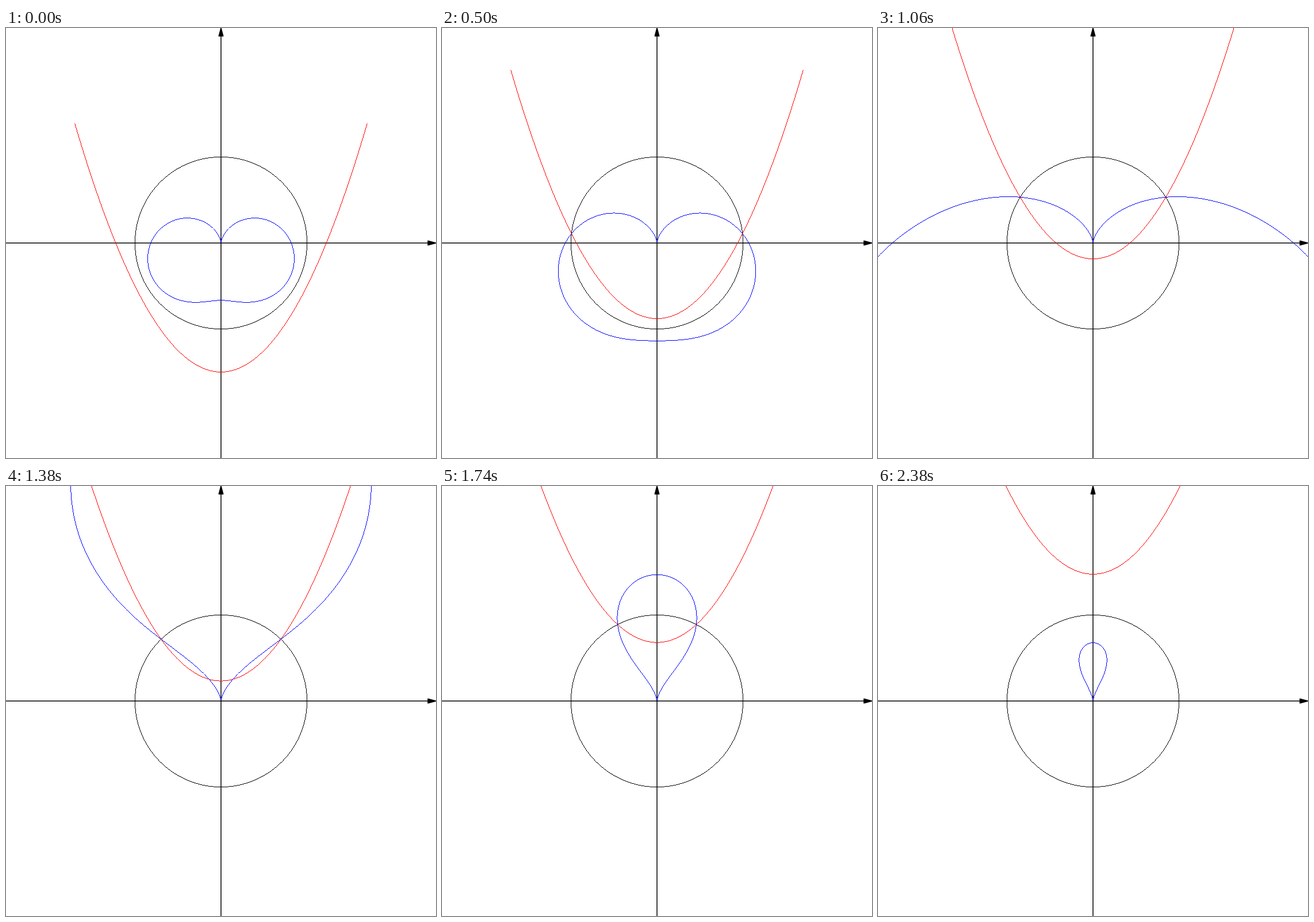
A matplotlib script for the animation above (2400 ms loop, 748x748 px).

```python
import matplotlib.pyplot as plt
import numpy as np
from matplotlib.animation import FuncAnimation

SIZE = 748
DPI = 64
PX = 72 / DPI          # one pixel in points
MID = SIZE / 2
UNIT = SIZE / 5        # the stage spans -2.5..2.5
FRAMES = 120
HALF = FRAMES // 2
GAP = 0.01             # the parabola's vertex skips the origin by this much

BLACK = (0, 0, 0, 255)
RED = (255, 0, 0, 255)
BLUE = (0, 0, 255, 255)

fig = plt.figure(figsize=(SIZE / DPI, SIZE / DPI), dpi=DPI, facecolor="white")
ax = fig.add_axes([0, 0, 1, 1])
ax.axis("off")


def axis_line(xs, ys):
    ax.plot(xs, ys, color="black", lw=1.5 * PX, solid_capstyle="butt",
            snap=False, zorder=1)


def arrow_head(points):
    ax.add_patch(plt.Polygon(points, closed=True, facecolor="black",
                             edgecolor="black", lw=1.5 * PX,
                             joinstyle="round", snap=False, zorder=1))


def trace(canvas, x, y, color):
    """Draw the right half of a symmetric curve and its mirror, one pixel wide."""
    x, y = MID + UNIT * x, MID - UNIT * y
    length = np.append(0, np.cumsum(np.hypot(np.diff(x), np.diff(y))))
    steps = np.arange(0, length[-1], 0.1)
    x, y = np.interp(steps, length, x), np.interp(steps, length, y)

    # One pixel for each column on flat parts, for each row on steep parts.
    flat = np.abs(np.diff(x)) >= np.abs(np.diff(y))
    before = np.where(flat, x[:-1], y[:-1])
    after = np.where(flat, x[1:], y[1:])
    hit = np.floor(before - 0.5) != np.floor(after - 0.5)
    col = np.floor(x[1:][hit]).astype(int)
    row = np.floor(y[1:][hit]).astype(int)

    inside = (col < SIZE) & (row >= 0) & (row < SIZE)
    col, row = col[inside], row[inside]
    canvas[row, col] = color
    canvas[row, SIZE - 1 - col] = color


axis_line([0, SIZE - 10], [MID, MID])
axis_line([MID, MID], [SIZE, 10])
arrow_head([(SIZE, MID), (SIZE - 14, MID - 3.75), (SIZE - 14, MID + 3.75)])
arrow_head([(MID, 0), (MID - 3.75, 14), (MID + 3.75, 14)])

base = np.zeros((SIZE, SIZE, 4), dtype=np.uint8)
angle = np.linspace(-np.pi / 2, np.pi / 2, 721)
trace(base, np.cos(angle), np.sin(angle), BLACK)

curves = ax.imshow(base, extent=(0, SIZE, SIZE, 0), aspect="auto",
                   interpolation="nearest", zorder=2)
ax.set_xlim(0, SIZE)
ax.set_ylim(SIZE, 0)

near_x = np.linspace(0, 1.7, 400)
wide_x = np.tan(np.linspace(0, np.arctan(10), 1500))


def draw(frame):
    second, step = divmod(frame, HALF)
    start = GAP if second else -1.5
    shift = start + (1.5 - GAP) * step / HALF

    canvas = base.copy()
    trace(canvas, near_x, near_x ** 2 + shift, RED)

    # Invert in the unit circle; points near the centre land off stage.
    y = wide_x ** 2 + shift
    norm = wide_x ** 2 + y ** 2
    keep = norm > 0.04
    trace(canvas, (wide_x / norm)[keep], (y / norm)[keep], BLUE)

    curves.set_data(canvas)
    return curves,


anim = FuncAnimation(fig, draw, frames=FRAMES, interval=20, repeat=True,
                     repeat_delay=0, blit=False)
plt.show()
```
